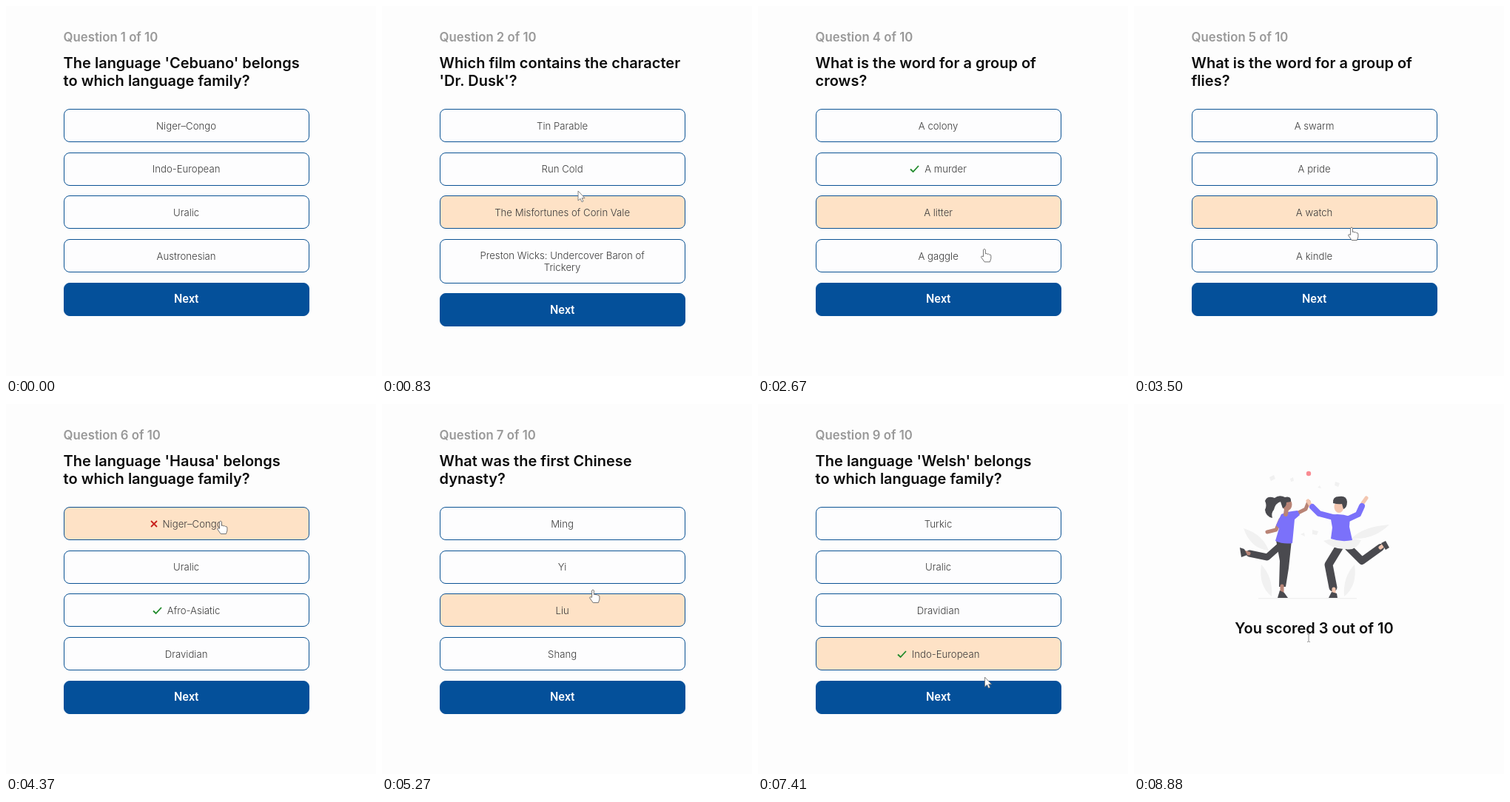
An HTML page for the animation above (9020 ms loop, 500 px wide and 500 px high).

```html
<!DOCTYPE html>
<html lang="en">
<head>
<meta charset="utf-8">
<title>Quiz</title>
<style>
  html, body { margin: 0; width: 100%; height: 100%; overflow: hidden; background: #fdfdfd; }
  body { position: relative; font-family: Inter, "Liberation Sans", sans-serif; }
  #quiz, #result, #cursor { position: absolute; left: 0; top: 0; width: 500px; height: 500px; }
  #count, #title, #list { position: absolute; left: 77.6px; }
  #count { top: 32px; font: 600 16.75px/20px Inter, sans-serif; color: #999; white-space: nowrap; }
  #title { top: 64.7px; font: 600 20px/24px Inter, sans-serif; color: #0c0c0c; white-space: nowrap; }
  #list { top: 139.3px; width: 332px; }
  .row {
    box-sizing: border-box; min-height: 45px; margin-bottom: 13.6px; padding: 12.9px 12px;
    display: flex; align-items: center; justify-content: center; text-align: center;
    border: 1.6px solid #0b5394; border-radius: 8px; background: #fdfdfe;
    font-size: 13.2px; font-weight: 350; line-height: 16px; color: #3c3c3c; white-space: nowrap;
  }
  .row.hover { background: #fee2c6; }
  .row svg { margin-right: 7px; fill: none; stroke-width: 1.8; }
  .next { background: #04509a; border-color: #04509a; color: #fff; font: 500 16px/16px Roboto, "Noto Sans", sans-serif; }
  #score { position: absolute; top: 291px; width: 487px; text-align: center; font: 600 20px/24px Inter, sans-serif; color: #0c0c0c; }
  #art { position: absolute; left: 0; top: 0; }
  .limb { fill: none; stroke-linecap: round; stroke-linejoin: round; }
</style>
</head>
<body>
<div id="quiz">
  <div id="count"></div>
  <div id="title"></div>
  <div id="list"></div>
</div>

<div id="result">
  <svg id="art" width="500" height="500">
    <g fill="#f1f1f1">
      <path d="M148 168Q174 176 182 198Q158 196 148 168M172 217Q188 234 186 260Q168 246 172 217M298 217Q282 234 284 260Q302 246 298 217M345 163Q308 166 294 182Q324 184 345 163"/>
      <path d="M168 262h133v1.4h-133z"/>
      <path d="M183 99l6-3 2 5-6 3zM211 101l4-2 1 5-4 1zM272 105l6 2-2 5-5-2zM198 125l4-2 2 4zM241 170l8 2-2 5-6-1zM225 176l5-2 1 5zM248 113l3-3 2 4z"/>
    </g>
    <circle id="dot" cx="236" cy="94" r="3.2" fill="#f98b92"/>

    <!-- dancer on the left -->
    <g>
      <path class="limb" d="M198 191L180 207L156 202" stroke="#4a4a4f" stroke-width="9"/>
      <path class="limb" d="M155 202L148 200" stroke="#b98476" stroke-width="5"/>
      <path d="M143 194L149 196L153 204L145 207Z" fill="#4a4a4f"/>
      <path d="M192 184H213L209 222L205 247H196L197 212Z" fill="#4a4a4f"/>
      <path class="limb" d="M200 246V254" stroke="#b98476" stroke-width="5"/>
      <path d="M197 252L203 255L208 262H194Z" fill="#4a4a4f"/>
      <path class="limb" d="M198 156L192 170L180 173M216 150L232 142L236 132" stroke="#b98476" stroke-width="5"/>
      <path d="M199 149Q208 145 221 144L224 150L217 156L214 188Q202 190 191 185L196 168L192 164Z" fill="#7b71fa"/>
      <path class="limb" d="M206 142L205 149" stroke="#b98476" stroke-width="6"/>
      <ellipse cx="207" cy="136" rx="6.5" ry="8" fill="#b98476"/>
      <path d="M212 132Q213 124 204 126Q196 122 190 127Q180 123 177 131Q180 137 177 143Q178 152 187 154Q185 147 189 143Q191 134 198 132L201 141Q206 139 206 133Z" fill="#4a4a4f"/>
    </g>

    <!-- dancer on the right -->
    <g>
      <path class="limb" d="M290 194L308 212L333 194" stroke="#4a4a4f" stroke-width="10"/>
      <path class="limb" d="M333 194L337 191" stroke="#f3c6b0" stroke-width="5"/>
      <path d="M334 188L340 185L345 194L340 197Z" fill="#4a4a4f"/>
      <path class="limb" d="M277 194L263 217L269 248" stroke="#4a4a4f" stroke-width="11"/>
      <path class="limb" d="M270 250V256" stroke="#f3c6b0" stroke-width="5"/>
      <path d="M267 254L274 256L275 262H263Z" fill="#4a4a4f"/>
      <path d="M256 185Q280 178 307 184Q300 199 286 196Q270 197 256 185Z" fill="#f1f1f1"/>
      <path class="limb" d="M240 139L235 131M309 134L314 127" stroke="#f3c6b0" stroke-width="5"/>
      <path class="limb" d="M269 153L250 148L241 139M288 156L303 149L308 138" stroke="#7b71fa" stroke-width="8"/>
      <path d="M265 150Q278 147 292 152L291 166L295 184Q280 187 266 182L268 167Z" fill="#7b71fa"/>
      <ellipse cx="277" cy="139" rx="6.5" ry="8" fill="#f3c6b0"/>
      <path d="M269 134Q268 125 277 125Q287 123 288 132Q288 140 283 142L281 135Q276 136 269 134Z" fill="#4a4a4f"/>
    </g>
  </svg>
  <div id="score">You scored 3 out of 10</div>
</div>

<svg id="cursor">
  <g id="pointer" stroke-linejoin="round">
    <path id="arrow" d="M0 0V13L3 10.3L5 14.8L7 14L5.1 9.6H9Z" fill="#fff" stroke="#777" stroke-width=".9"/>
    <path id="hand" d="M-1.4 1Q0-1 1.4 1V6.5Q3 5.4 4.1 7Q5.6 6 6.6 7.7Q8.6 7 8.9 9V13L7.4 17.5H.2L-4.4 11Q-4.4 8.7-1.4 10.3Z" fill="#fff" stroke="#666" stroke-width=".9"/>
    <path id="beam" d="M-2-5.5Q0-5.5 0-4.5Q0-5.5 2-5.5M0-4.5V4.5M-2 5.5Q0 5.5 0 4.5Q0 5.5 2 5.5" fill="none" stroke="#8c8c8c" stroke-width=".9"/>
  </g>
</svg>

<script>
const LOOP = 9020, END = 8340;
const $ = id => document.getElementById(id);
const family = name => `The language '${name}' belongs<br>to which language family?`;
const group = name => `What is the word for a group of<br>${name}?`;

// via: extra cursor points [time, x, y] on the way to the answer
const questions = [
  { start: 0, click: 200, pick: 2, right: 3, title: family("Cebuano"),
    options: ["Niger–Congo", "Indo-European", "Uralic", "Austronesian"] },
  { start: 480, click: 930, pick: 1, right: 3, via: [[780, 265, 262], [830, 265, 250]],
    title: "Which film contains the character<br>'Dr. Dusk'?",
    options: ["Tin Parable", "Run Cold", "The Misfortunes of Corin Vale", "Preston Wicks: Undercover Baron of<br>Trickery"] },
  { start: 1200, click: 1480, pick: 2, right: 2, title: group("dolphins"),
    options: ["A parliament", "A clowder", "A school", "A stud"] },
  { start: 1840, click: 2320, pick: 1, right: 1, title: group("crows"),
    options: ["A colony", "A murder", "A litter", "A gaggle"] },
  { start: 2950, click: 3630, pick: 2, right: 0, via: [[3340, 296, 290], [3500, 294, 299]], title: group("flies"),
    options: ["A swarm", "A pride", "A watch", "A kindle"] },
  { start: 3950, click: 4360, pick: 0, right: 2, title: family("Hausa"),
    options: ["Niger–Congo", "Uralic", "Afro-Asiatic", "Dravidian"] },
  { start: 4800, click: 5390, pick: 1, right: 3, via: [[5250, 285, 258], [5270, 285, 251]],
    title: "What was the first Chinese<br>dynasty?", options: ["Ming", "Yi", "Liu", "Shang"] },
  { start: 5750, click: 6500, pick: 2, right: 1,
    title: "Which English rock band released<br>the studio album 'Velvet Kettles'?",
    options: ["Lacquer Hours", "The Wandering Kilns", "Restless?", "DuWren"] },
  { start: 6800, click: 7190, pick: 3, right: 3, title: family("Welsh"),
    options: ["Turkic", "Uralic", "Dravidian", "Indo-European"] },
  { start: 7600, click: 7990, pick: 1, right: 0, title: group("lions"),
    options: ["A pride", "A flock", "A swarm", "A herd"] }
];

const CHECK = '<svg width="13" height="12" stroke="#1f8a2a"><path d="M1 6.5L4.6 10L12 2"/></svg>';
const CROSS = '<svg width="10" height="12" stroke="#c8201c"><path d="M1 2L9 10M9 2L1 10"/></svg>';

function questionAt(t) {
  return t >= END ? -1 : questions.findLastIndex(q => t >= q.start);
}

// Top and bottom of the four answers and the button
function rows(q) {
  let top = 139.3;
  return [...q.options, ""].map(text => {
    const height = text.includes("<br>") ? 61 : 45;
    const row = [top, top + height];
    top += height + 13.6;
    return row;
  });
}

function buildPath() {
  const path = [[30, 330, 498]];
  questions.forEach((q, i) => {
    const next = questions[i + 1]?.start ?? END;
    const [, x, y] = path.at(-1);
    const spot = [290, 158 + 58.6 * q.pick];
    if (i) path.push([q.start + 50, x, y]);
    path.push(...(q.via || []), [q.click - 50, ...spot], [q.click + 70, ...spot]);
    path.push([next - 100, 314, rows(q)[4][0] + 11.3]);
  });
  path.push([END + 20, 314, 385], [8620, 240, 430], [8800, 236, 316]);
  return path;
}
const path = buildPath();

function cursorAt(t) {
  const i = path.findIndex(p => p[0] > t);
  if (i < 0) return path.at(-1).slice(1);
  if (!i) return path[0].slice(1);
  const [t0, x0, y0] = path[i - 1], [t1, x1, y1] = path[i];
  const u = (t - t0) / (t1 - t0), k = u * u * (3 - 2 * u);
  return [x0 + (x1 - x0) * k, y0 + (y1 - y0) * k];
}

// Index of the row under the cursor, or -1
function rowAt(t) {
  const i = questionAt(t);
  if (t < 30 || i < 0) return -1;
  const [x, y] = cursorAt(t);
  return rows(questions[i]).findIndex(([a, b]) => x > 78 && x < 409 && y >= a && y <= b);
}

function cursorKind(t) {
  if (t < 30) return "";
  if (t < END) return rowAt(t - 20) < 0 ? "arrow" : "hand";
  const [x, y] = cursorAt(t);
  return x > 136 && x < 351 && y > 291 && y < 325 ? "beam" : "arrow";
}

function mark(q, i, answered) {
  if (!answered) return "";
  return i === q.right ? CHECK : i === q.pick ? CROSS : "";
}

let shown = "";
function showQuestion(i, answered) {
  const key = i + ":" + answered;
  if (key === shown) return;
  shown = key;
  const q = questions[i];
  $("count").textContent = `Question ${i + 1} of ${questions.length}`;
  $("title").innerHTML = q.title;
  $("list").innerHTML = q.options
    .map((text, n) => `<div class="row">${mark(q, n, answered)}<span>${text}</span></div>`)
    .join("") + '<div class="row next">Next</div>';
}

function draw(t) {
  const i = questionAt(t), done = i < 0;
  $("quiz").style.display = done ? "none" : "";
  $("result").style.display = done ? "" : "none";
  if (done) {
    const p = Math.min(1, Math.max(0, (t - END) / 480));
    $("art").style.opacity = p;
    $("dot").setAttribute("cy", 94 + 30 * (1 - p) ** 2);
  } else {
    showQuestion(i, t >= questions[i].click);
    const hover = rowAt(t - 50);
    [...$("list").children].forEach((el, n) => el.classList.toggle("hover", n === hover && n < 4));
  }
  const kind = cursorKind(t);
  for (const id of ["arrow", "hand", "beam"]) $(id).style.display = id === kind ? "" : "none";
  $("pointer").setAttribute("transform", `translate(${cursorAt(t)})`);
}

const begin = performance.now();
function tick() {
  draw((performance.now() - begin) % LOOP);
  requestAnimationFrame(tick);
}
tick();
</script>
</body>
</html>
```
